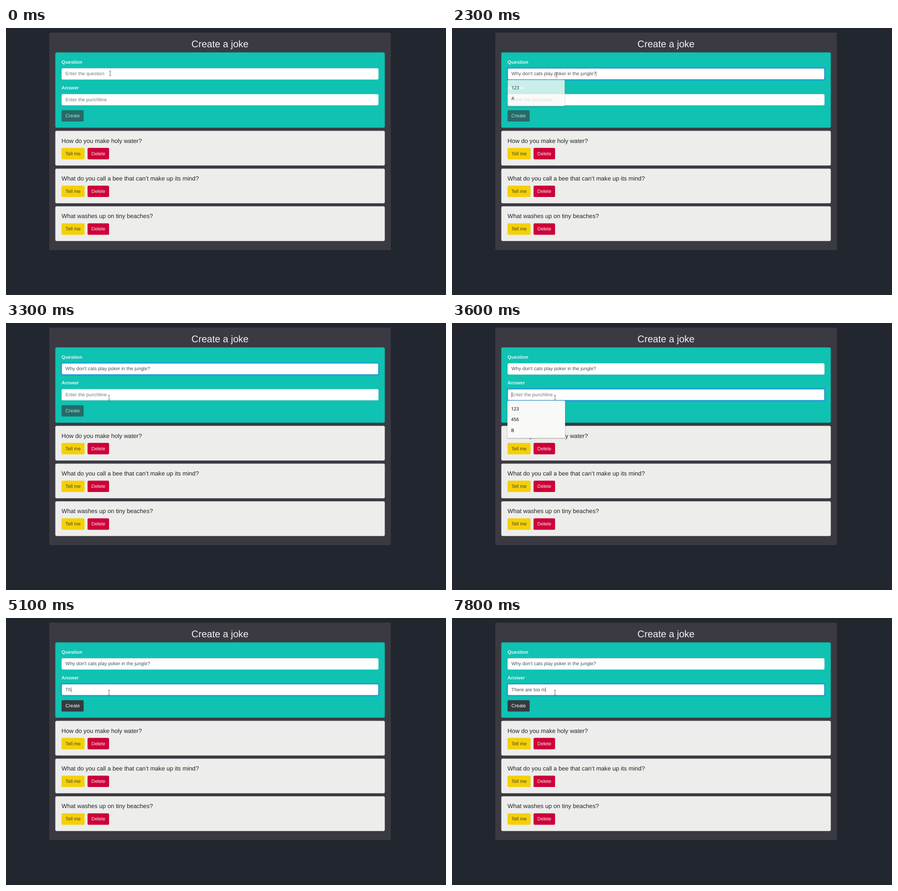
Write an HTML page that moves like this. It is 961 by 583 pixels and loops after 8 s.

```html
<!DOCTYPE html>
<html lang="en">
<head>
<meta charset="utf-8">
<title>Create a joke</title>
<style>
  html, body { margin: 0; width: 100%; height: 100%; overflow: hidden; background: #22262e; }
  svg { display: block; width: 961px; height: 583px; }
  text {
    font: 10.48px "Liberation Sans", Arial, sans-serif;
    white-space: pre;
    text-rendering: geometricPrecision;
  }
  .heading { font-size: 20.96px; fill: #f3f3f4; text-anchor: middle; }
  .label { font-weight: bold; fill: #e4f4f2; }
  .title { font-size: 13.1px; fill: #212529; }
  .option { font: 600 10.1px "Open Sans", "Noto Sans", sans-serif; fill: #3a3a3a; }
  .popup {
    filter: drop-shadow(0 1px 1px rgba(0, 0, 0, .35));
    transform-box: fill-box;
    transform-origin: center;
  }
</style>
</head>
<body>
<svg id="stage" viewBox="0 0 961 583"></svg>
<script>
const LOOP = 8000;
const LEFT = 121.3;
const TEXT_X = 129.8;
const QUESTION = "Why don't cats play poker in the jungle?";

const rect = (x, y, w, h, fill, extra = "") =>
  `<rect x="${x}" y="${y}" width="${w}" height="${h}" rx="2.6" fill="${fill}" ${extra}/>`;
const bordered = (x, y, w, h, fill, border) =>
  rect(x + .3, y + .3, w - .6, h - .6, fill, `stroke="${border}" stroke-width=".6"`);
const text = (x, y, content, extra = "") => `<text x="${x}" y="${y}" ${extra}>${content}</text>`;
const button = (x, y, w, fill, color, label, id = "") =>
  `<g ${id}>${rect(x, y, w, 24.9, fill)}${text(x + 8.5, y + 15.8, label, `fill="${color}"`)}</g>`;

const field = (name, y) => `
  ${bordered(LEFT, y, 692.4, 24.9, "#fff", "#ced4da")}
  <g id="${name}Ring">
    ${rect(LEFT - 1.2, y - 1.2, 694.8, 27.3, "none", 'stroke="#007bff" stroke-opacity=".25" stroke-width="2"')}
    ${rect(LEFT, y, 692.4, 24.9, "none", 'stroke="#2f92da" stroke-width="1.6"')}
  </g>
  ${text(TEXT_X, y + 15.6, "", `id="${name}Text"`)}
  <rect id="${name}Caret" y="${y + 7}" width=".8" height="11" fill="#555"/>`;

const popup = (name, y, options) => `
  <g id="${name}Popup" class="popup">
    ${rect(121, y, 126, 11 + options.length * 23.5, "#f9f9f8")}
    ${options.map((o, i) => text(129, y + 21 + i * 23.5, o, 'class="option"')).join("")}
  </g>`;

const card = (title, i) => {
  const y = 224.5 + i * 82.4;
  return bordered(107.6, y, 719.8, 75.9, "#ededeb", "#d0d0cf") +
    text(LEFT, y + 26, title, 'class="title"') +
    button(LEFT, y + 37.3, 50.3, "#f5d005", "#4c4330", "Tell me") +
    button(178.1, y + 37.3, 47, "#cd0039", "#fbeef1", "Delete");
};

document.getElementById("stage").innerHTML = `
  ${rect(94.5, 10, 746, 475, "#3b3a42")}
  ${text(467.4, 42.4, "Create a joke", 'class="heading"')}
  ${bordered(107.6, 53.2, 719.8, 164.6, "#0fc2b2", "#0db0a2")}
  ${text(LEFT, 78, "Question", 'class="label"')}
  ${field("question", 87.8)}
  ${text(LEFT, 134.2, "Answer", 'class="label"')}
  ${field("answer", 144.1)}
  ${button(LEFT, 179.4, 48.3, "#276a68", "#abe5e1", "Create", 'id="createOff"')}
  ${button(LEFT, 179.4, 48.3, "#343a40", "#fff", "Create", 'id="createOn"')}
  ${["How do you make holy water?",
     "What do you call a bee that can’t make up its mind?",
     "What washes up on tiny beaches?"].map(card).join("")}
  ${popup("question", 113, ["123", "A"])}
  ${popup("answer", 169.5, ["123", "456", "B"])}
  <path id="pointer" d="M-2.3 -5.2H-.6L0 -4.6L.6 -5.2H2.3M0 -4.6V4.6M-2.3 5.2H-.6L0 4.6L.6 5.2H2.3"
    fill="none" stroke="#555" stroke-width=".9"/>`;

// Tracks hold [time, value] steps; a value lasts until the next step.
const pointerTrack = [
  [0, [227.5, 99]], [600, [228.3, 102]], [2800, [228, 110]], [2900, [227.5, 124]],
  [3100, [227, 140]], [3200, [226, 155]], [3300, [225, 163]]
];
const answerTrack = [
  [0, ""], [4700, "T"], [5100, "Th"], [5200, "The"], [5400, "Ther"], [5600, "There"],
  [6000, "There "], [6300, "There a"], [6700, "There ar"], [6800, "There are "],
  [6900, "There are t"], [7100, "There are to"], [7300, "There are too"], [7800, "There are too m"]
];
const questionPopupTrack = [[0, 0], [900, 1], [2300, .8], [2400, .5], [2500, .18], [2800, 0]];
const answerPopupTrack = [[0, 0], [3500, .6], [3600, 1], [4700, .8], [4800, .5], [4900, .18], [5100, 0]];

const at = (track, t) => track.findLast(([start]) => start <= t)[1];
const within = (t, from, to) => t >= from && t < to;
const el = id => document.getElementById(id);
const show = (id, opacity) => el(id).setAttribute("opacity", +opacity);

function drawField(name, value, placeholder, focused, caretOn) {
  const label = el(name + "Text");
  label.textContent = value || placeholder;
  label.setAttribute("fill", value ? "#495057" : "#757b80");
  const caretX = TEXT_X + (value ? label.getComputedTextLength() : 0);
  el(name + "Caret").setAttribute("x", caretX);
  show(name + "Ring", focused);
  show(name + "Caret", caretOn);
}

// Popups shrink slightly while they fade.
function drawPopup(id, opacity) {
  show(id, opacity);
  el(id).style.transform = `scale(${.94 + .06 * opacity})`;
}

function draw(t) {
  const answer = at(answerTrack, t);
  drawField("question", t < 2300 ? "" : QUESTION, "Enter the question",
    within(t, 900, 3500), within(t, 900, 1400) || within(t, 2300, 2800));
  drawField("answer", answer, "Enter the punchline",
    t >= 3500, within(t, 3500, 4500) || t >= 4700);
  drawPopup("questionPopup", at(questionPopupTrack, t));
  drawPopup("answerPopup", at(answerPopupTrack, t));
  show("createOff", !answer);
  show("createOn", answer !== "");
  el("pointer").setAttribute("transform", `translate(${at(pointerTrack, t)})`);
}

const start = performance.now();
function tick() {
  draw((performance.now() - start) % LOOP);
  requestAnimationFrame(tick);
}
tick();
</script>
</body>
</html>
```
